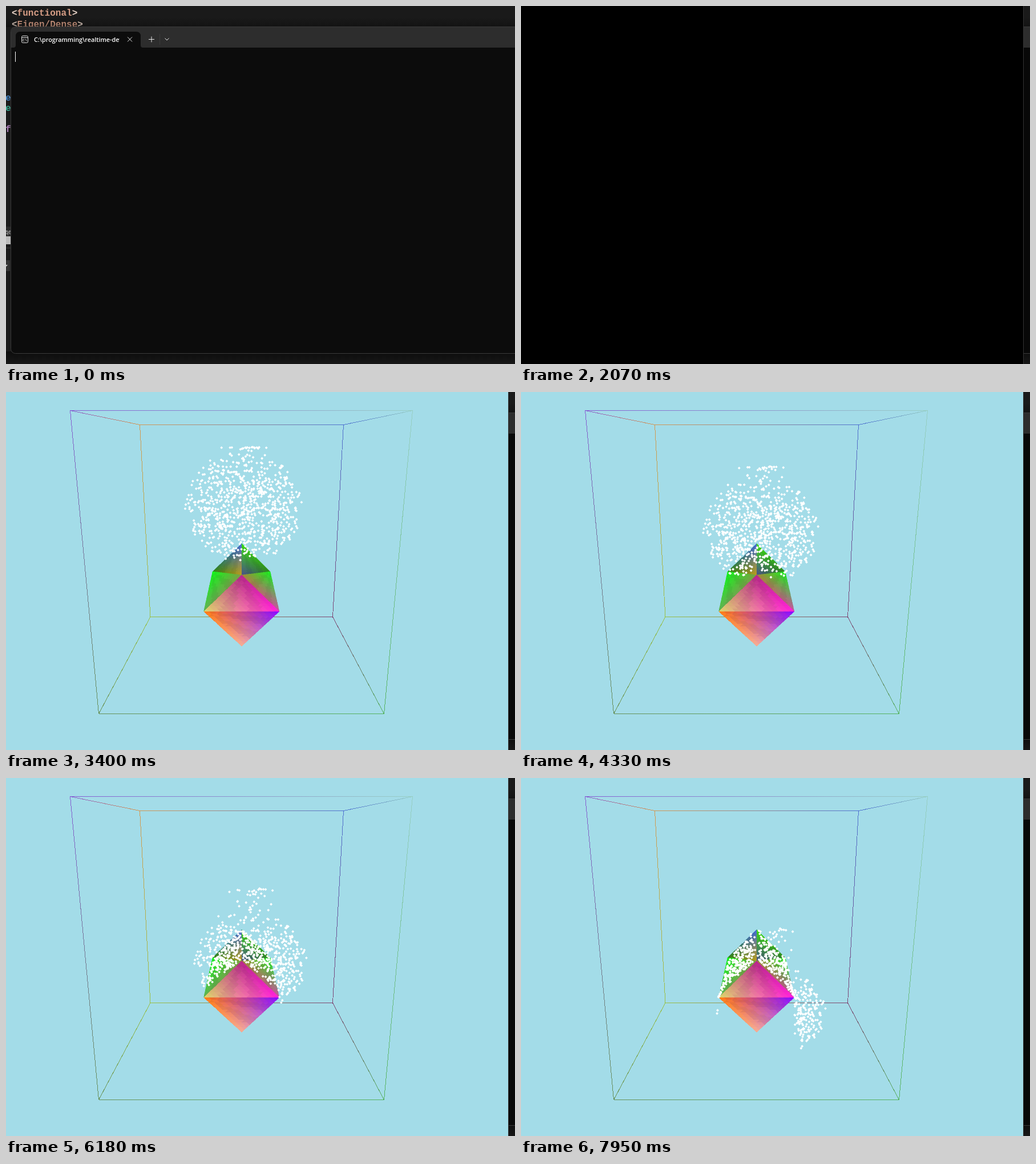
An HTML page that plays this animation: 892 by 628 pixels, repeating every 8000 ms.

```html
<!DOCTYPE html>
<html lang="en">
<head>
<meta charset="utf-8">
<title>Particle simulation</title>
<style>
  html, body { margin: 0; width: 100%; height: 100%; overflow: hidden; background: #000; }
  svg { display: block; width: 100%; height: 100%; }
  .code { font: bold 16px "Liberation Mono", monospace; }
  .tab { font: 600 10.8px "Open Sans", sans-serif; }
  .small { font: 10px "Noto Sans", sans-serif; }
</style>
</head>
<body>
<svg viewBox="0 0 892 628" xmlns="http://www.w3.org/2000/svg">
  <defs>
    <linearGradient id="topShade" x2="0" y2="1">
      <stop offset="0" stop-color="#000" stop-opacity="0"/>
      <stop offset="1" stop-color="#000" stop-opacity=".3"/>
    </linearGradient>
    <linearGradient id="bottomShade" x2="0" y2="1">
      <stop offset="0" stop-color="#0c0c0c"/>
      <stop offset="1" stop-color="#171717"/>
    </linearGradient>
    <clipPath id="titleClip"><rect x="49" y="46" width="150" height="26"/></clipPath>
  </defs>

  <g id="desktop">
    <rect width="892" height="628" fill="#1a1a1a"/>
    <g class="code" fill="#d69d85">
      <text x="10" y="17"><tspan fill="#e6d2c6">&lt;</tspan>functional<tspan fill="#e6d2c6">&gt;</tspan></text>
      <text x="10" y="36.5"><tspan fill="#e6d2c6">&lt;</tspan>Eigen/Dense<tspan fill="#e6d2c6">&gt;</tspan></text>
      <text x="-1" y="166" fill="#4484c4">e</text>
      <text x="-1" y="184" fill="#36a68e">e</text>
      <text x="-1" y="221" fill="#a87cb4">f</text>
    </g>
    <rect y="387" width="9" height="17" fill="#2a2a2a"/>
    <text class="small" x="-2" y="400" fill="#bbb">де</text>
    <rect y="404" width="9" height="14" fill="#bcbcbc"/>
    <path d="M0 424.5h9" stroke="#383838"/>
    <rect y="446" width="7" height="19" fill="#333"/>
    <path d="M-2 454h5l-2.500 3z" fill="#ccc"/>
    <rect y="20" width="892" height="17" fill="url(#topShade)"/>
    <rect y="606" width="892" height="22" fill="url(#bottomShade)"/>

    <rect x="8.500" y="36.500" width="900" height="573" rx="8" fill="#0c0c0c"/>
    <path d="M9 73V45q0-8 8-8H892V73z" fill="#2d2d2d"/>
    <rect x="8.500" y="36.500" width="900" height="573" rx="8" fill="none" stroke="#3b3b3b"/>
    <path d="M13 73q4 0 4-4V53q0-8 8-8H228q8 0 8 8V69q0 4 4 4z" fill="#0c0c0c"/>
    <g fill="none" stroke="#e8e8e8">
      <rect x="27.500" y="52.500" width="11" height="12" rx="2"/>
      <path d="M27.500 55.500h11"/>
      <path d="M31.500 58.500h-2v3h2M33 58v1M33 61v1M34.500 58l2 4" stroke-width=".8"/>
      <path d="M213 54.500l8 8M221 54.500l-8 8M250 58.500h10M255 53.500v10M278.500 56.500l3.500 3.500 3.500-3.500"/>
    </g>
    <path d="M269.500 49v19" stroke="#3c3c3c"/>
    <text class="tab" x="49" y="63" fill="#fff" clip-path="url(#titleClip)">C:\programming\realtime-deformation</text>
    <rect id="cursor" x="16" y="80" width="1" height="18" fill="#fff"/>
  </g>

  <g id="viewer">
    <rect x="881" y="73" width="11" height="536" fill="#000" opacity=".3"/>
    <rect width="880" height="628" fill="#000"/>
    <rect x="880" width="1" height="628" fill="#333"/>
  </g>

  <g id="scene">
    <rect width="880" height="628" fill="#a3dce8"/>
    <g id="cage" shape-rendering="crispEdges"></g>
    <g id="solid" shape-rendering="crispEdges"></g>
    <path id="particles" fill="#fff"/>
  </g>
</svg>

<script>
const LOOP = 8000;
const SCENE_TIMES = [2750, 3400, 3800, 4330, 4830, 5360, 5780, 6180, 6480, 6880, 7280, 7560, 7950];
const OPENING_TIMES = [1700, 1820, 1950, 2070];
const BLINK_TIMES = [150, 650, 1190];
const PARTICLES = 900;
const CEILING_PARTICLES = 16;

const $ = id => document.getElementById(id);
const countPassed = (times, t) => times.filter(x => t >= x).length;
const lerp = (a, b, u) => a + (b - a) * u;

function add(parent, tag, attrs) {
  const el = document.createElementNS("http://www.w3.org/2000/svg", tag);
  for (const key in attrs) el.setAttribute(key, attrs[key]);
  return parent.appendChild(el);
}

// Wire cage: x, y, colour of each corner
const corners = [
  [112, 32, "#8048d0"], [712, 32, "#96cdbf"], [662, 564, "#48ac48"], [162, 564, "#5c8440"],
  [234, 57, "#dc8c38"], [591, 57, "#4060cc"], [572, 394, "#78285c"], [252.5, 394, "#98bc28"]
];
const edges = [];
for (let i = 0; i < 4; i++) {
  const j = (i + 1) % 4;
  edges.push([i, j], [i + 4, j + 4], [i, i + 4]);
}
const wires = edges.map(([a, b], i) => {
  const [x1, y1, from] = corners[a], [x2, y2, to] = corners[b];
  const line = { x1: x1 + .5, y1: y1 + .5, x2: x2 + .5, y2: y2 + .5 };
  const gradient = add($("cage"), "linearGradient",
    { id: "wire" + i, gradientUnits: "userSpaceOnUse", ...line });
  add(gradient, "stop", { offset: 0, "stop-color": from });
  add(gradient, "stop", { offset: 1, "stop-color": to });
  return add($("cage"), "line", line);
});

// Solid: faces blended between corner colours, with faint wedges fanning from the first corner
const rgb = hex => [1, 3, 5].map(i => parseInt(hex.slice(i, i + 2), 16));

function drawFace(points, colours, n = 14) {
  const inks = colours.map(rgb);
  const mix = (sets, i, j, axis) =>
    (sets[0][axis] * (n - i - j) + sets[1][axis] * i + sets[2][axis] * j) / n;
  const facet = cells => {
    const [ci, cj] = cells.reduce((s, c) => [s[0] + c[0] / 3, s[1] + c[1] / 3], [0, 0]);
    const wedge = Math.floor(5 * cj / (ci + cj));
    const light = wedge % 2 ? .97 : 1.02;
    const fill = `rgb(${[0, 1, 2].map(c => Math.min(255, Math.round(mix(inks, ci, cj, c) * light)))})`;
    const outline = cells.map(([i, j]) => [mix(points, i, j, 0), mix(points, i, j, 1)].join()).join(" ");
    add($("solid"), "polygon", { points: outline, fill, stroke: fill, "stroke-width": .5 });
  };
  for (let i = 0; i < n; i++) {
    for (let j = 0; j < n - i; j++) {
      facet([[i, j], [i + 1, j], [i, j + 1]]);
      if (i + j < n - 1) facet([[i + 1, j], [i + 1, j + 1], [i, j + 1]]);
    }
  }
}

const peak = [413, 266], middle = [413, 321], bottom = [413, 446];
const upperLeft = [362, 315], upperRight = [463, 315];
const lowerLeft = [346.5, 385], lowerRight = [479, 385];
drawFace([peak, upperLeft, middle], ["#4468d8", "#2c8014", "#b89a1c"]);
drawFace([peak, middle, upperRight], ["#3cdc14", "#485088", "#2c8818"]);
drawFace([upperLeft, lowerLeft, middle], ["#10f418", "#5cb050", "#7c9a44"]);
drawFace([upperRight, lowerRight, middle], ["#14f01c", "#c0549c", "#a08438"]);
drawFace([middle, lowerLeft, lowerRight], ["#b42488", "#d8d468", "#ff1cd8"]);
drawFace([lowerLeft, lowerRight, bottom], ["#ff7c10", "#8408ff", "#f4ac90"]);

// Particles: a ball that drops and settles on the upper faces
let seed = 77;
function random() {
  seed = (seed * 1664525 + 1013904223) % 4294967296;
  return seed / 4294967296;
}
const HALF_WIDTH = 66.5;
const fall = k => 17.6 * k - .19 * k * k;

function restHeight(x, depth) {
  const dx = Math.abs(x - 413);
  const back = dx < 50 ? 266 + dx * .98 : 315 + (dx - 50) * 4.24;
  return lerp(back, 321 + dx * .96, depth);
}

function startPoint(i) {
  if (i < CEILING_PARTICLES) return [371 + 85 * random(), 79 + random(), 0];
  let x, y, z;
  do {
    [x, y, z] = [0, 0, 0].map(() => random() * 2 - 1);
  } while (x * x + y * y + z * z > 1);
  return [414.5 + 104 * x, Math.max(79, 181 + 102 * y), z];
}

function trace(i) {
  const [x0, y0, z] = startPoint(i);
  const depth = Math.min(.9, Math.max(.04, .47 + .52 * z));
  const buried = random() < .3;
  const spread = .008 + Math.abs(x0 - 414) * .0001;
  const speed = Math.min(1 + .12 * random() ** 2 + (y0 - 79) * spread, 1.36 - .0013 * (y0 - 100));
  const path = [];
  let x = x0, y = y0, state = "free";
  for (let k = 0; k < SCENE_TIMES.length; k++) {
    if (state === "free") {
      x = 414.3 + 2.05 * k + (x0 - 414.3) * (1 - .0062 * k);
      y = y0 + fall(k) * speed;
      if (Math.abs(x - 413) < HALF_WIDTH && y >= restHeight(x, depth)) state = "resting";
    } else if (state === "resting") {
      x += Math.sign(x - 413) * .8;
      if (Math.abs(x - 413) >= HALF_WIDTH) state = "slipped";
    } else {
      y += 16;
    }
    if (state === "resting") y = restHeight(x, depth);
    path.push(state === "resting" && buried ? null : [x, y]);
  }
  return path;
}

const traces = Array.from({ length: PARTICLES }, (_, i) => trace(i));
const clouds = SCENE_TIMES.map((_, k) => traces
  .filter(path => path[k])
  .map(path => {
    const [x, y] = path[k];
    return `M${x.toFixed(1)} ${(y - 2.4).toFixed(1)}l2.4 2.4-2.4 2.4-2.4-2.4z`;
  })
  .join(""));

function render(t) {
  const opened = countPassed(OPENING_TIMES, t);
  const step = countPassed(SCENE_TIMES, t) - 1;

  $("cursor").setAttribute("visibility", countPassed(BLINK_TIMES, t) % 2 ? "hidden" : "visible");
  $("viewer").setAttribute("opacity", [0, .35, .7, .92, 1][opened]);
  const scale = [.97, .97, .985, .995, 1][opened];
  $("viewer").setAttribute("transform", `scale(${scale} 1)`);

  $("scene").setAttribute("display", step < 0 ? "none" : "inline");
  if (step < 0) return;
  wires.forEach((wire, i) => wire.setAttribute("stroke", step ? `url(#wire${i})` : "#000"));
  $("cage").setAttribute("stroke-opacity", step ? .85 : 1);
  $("particles").setAttribute("d", clouds[step]);
}

const start = performance.now();
function tick() {
  render((performance.now() - start) % LOOP);
  requestAnimationFrame(tick);
}
tick();
</script>
</body>
</html>
```
